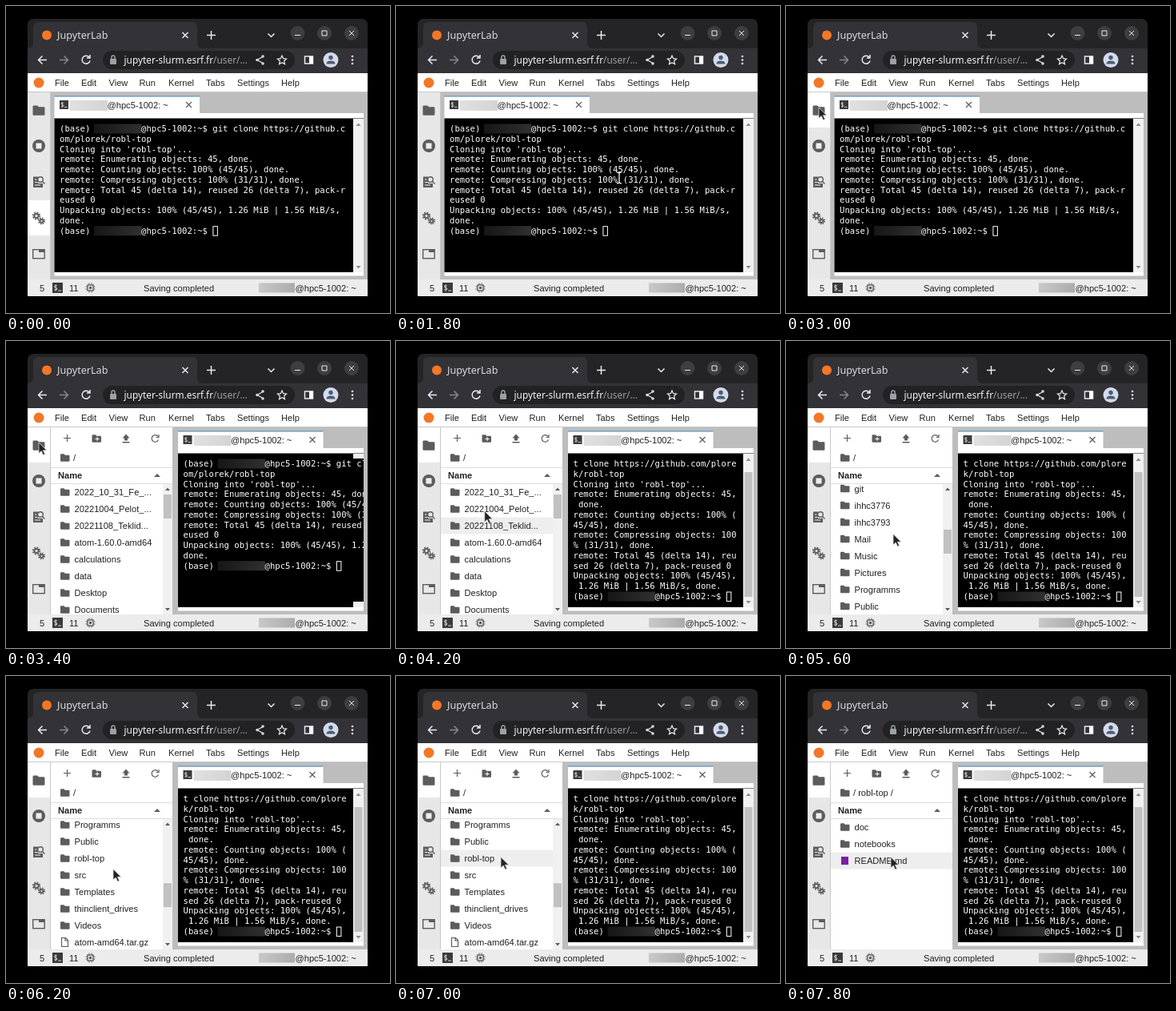
An HTML page for the animation above (8 s loop, 480 px wide and 384 px high).

```html
<!DOCTYPE html>
<html lang="en">
<head>
<meta charset="utf-8">
<title>JupyterLab file browser</title>
<style>
  html, body { margin: 0; width: 100%; height: 100%; overflow: hidden; background: #000; }
  svg { display: block; width: 100vw; height: 100vh; }
  text { font: 11.1px "Liberation Sans", Arial, sans-serif; fill: #212121; white-space: pre; }
  .chrome text { font: 11.85px "Noto Sans", "Open Sans", sans-serif; fill: #f1f3f4; }
  .chrome .title { font-size: 12.6px; fill: #dadce0; }
  .chrome .dim { fill: #9aa0a6; }
  .term text { font: 10.6px "DejaVu Sans Mono", monospace; fill: #fff; }
  .bold { font-weight: bold; }
  .line { fill: none; stroke: #e8eaed; stroke-width: 1.5; }
  .ink { fill: none; stroke: #5c5c5c; stroke-width: 1.4; }
  .icon { fill: #5c5c5c; }
</style>
</head>
<body>
<svg viewBox="0 0 480 384">
  <defs>
    <path id="folder" d="M0 1.3Q0 .3 1 .3h3.4l1.4 1.5h4.7q1 0 1 1v6q0 1-1 1H1q-1 0-1-1z"/>
    <g id="prompt">
      <rect width="11" height="11" fill="#3a3a3a"/>
      <path d="M4.800 3.300q-2.800-.8-2.800.8 0 1 1.500 1.300t1.500 1.400q0 1.600-3 .7M3.500 2v7M6 8.500h3.500" fill="none" stroke="#ddd" stroke-width=".8"/>
    </g>
    <linearGradient id="pale"><stop stop-color="#e0e0e0"/><stop offset="1" stop-color="#d4d4d4"/></linearGradient>
    <linearGradient id="mid"><stop stop-color="#c8c8c8"/><stop offset="1" stop-color="#acacac"/></linearGradient>
    <linearGradient id="dark"><stop stop-color="#161616"/><stop offset="1" stop-color="#303030"/></linearGradient>
    <clipPath id="window"><path d="M27 24q0-8 8-8h409q8 0 8 8v339H27z"/></clipPath>
    <clipPath id="pane"><rect x="55" y="107" width="392" height="235"/></clipPath>
    <clipPath id="listBox"><rect x="55" y="179" width="153" height="163"/></clipPath>
  </defs>

  <g clip-path="url(#window)">
    <g class="chrome">
      <rect x="27" y="16" width="425" height="40" fill="#242426"/>
      <path d="M27 53q7 0 7-7V27q0-7 7-7h191q7 0 7 7v19q0 7 7 7h206v31H27z" fill="#333236"/>
      <circle cx="51" cy="36.500" r="6" fill="#f37726"/>
      <text class="title" x="64" y="41">JupyterLab</text>
      <path class="line" d="M220.500 33l7 7m0-7l-7 7M251 36.500h11m-5.500-5.500v11M327.500 34.500l4 4 4-4"/>
      <g fill="#3e3e40"><circle cx="364.500" cy="34" r="9"/><circle cx="398" cy="34" r="9"/><circle cx="432" cy="34" r="9"/></g>
      <path class="line" style="stroke-width:1" d="M361 36.500h7M395 31h6v6h-6zM429 31l6 6m0-6l-6 6"/>

      <rect x="121" y="56" width="240" height="23" rx="11.500" fill="#222224"/>
      <path class="line" d="M51 67.500H40.500m5-5l-5 5 5 5"/>
      <path class="line" style="stroke:#85878a" d="M67 67.500h10.500m-5-5l5 5-5 5"/>
      <path class="line" d="M104 64a5 5 0 1 0 1 4.500M105 61v4h-4"/>
      <rect x="130" y="66" width="8" height="7" rx="1" fill="#9aa0a6"/>
      <path class="line" style="stroke:#9aa0a6" d="M132 66v-2a2 2 0 0 1 4 0v2"/>
      <text x="147.500" y="72">jupyter-slurm.esrf.fr<tspan class="dim">/user/...</tspan></text>
      <path class="line" style="stroke-width:1.200" d="M321 63.500l-7 4 7 4"/>
      <g fill="#d5d7da"><circle cx="321" cy="63" r="1.800"/><circle cx="314" cy="67.500" r="1.800"/><circle cx="321" cy="72" r="1.800"/></g>
      <path class="line" style="stroke-width:1.200" d="M345 62l1.600 3.700 4 .4-3 2.700.9 4-3.500-2.100-3.500 2.100.9-4-3-2.700 4-.4z"/>
      <rect class="line" x="373.500" y="63" width="10" height="9"/>
      <rect x="379" y="63" width="5" height="9" fill="#fff"/>
      <circle cx="406" cy="67.500" r="9.500" fill="#d3dced"/>
      <circle cx="406" cy="64.500" r="2.700" fill="#4f5b70"/>
      <path d="M400.500 72.500q0-4 5.500-4t5.500 4z" fill="#4f5b70"/>
      <g fill="#e8eaed"><circle cx="433" cy="63" r="1.300"/><circle cx="433" cy="67.500" r="1.300"/><circle cx="433" cy="72" r="1.300"/></g>
    </g>

    <rect x="27" y="84" width="425" height="279" fill="#fff"/>
    <circle cx="41" cy="96" r="6.500" fill="#f37726"/>
    <g id="menu"></g>

    <rect x="27" y="107" width="28" height="235" fill="#e8e7e8"/>
    <rect id="activeCell" x="27" width="28" height="44" fill="#fff"/>
    <g class="icon">
      <use href="#folder" transform="translate(33.500 124) scale(1.300)"/>
      <circle cx="41" cy="175" r="8"/><rect x="37.500" y="171.500" width="7" height="7" fill="#eee"/>
      <path d="M34 213.500h6v13.500h-6zM40 222h6v5h-6z"/>
      <path d="M36 217h2.500m-2.500 3.500h3.500m-3.500 3.500h7" stroke="#eee"/>
    </g>
    <circle class="ink" cx="43" cy="217" r="3.300"/>
    <path class="ink" d="M45.500 219.500l3 3"/>
    <g class="ink" style="stroke-width:1.900">
      <circle cx="38" cy="262.500" r="2.500"/><circle cx="38" cy="262.500" r="4.200" stroke-dasharray="1.800 1.500"/>
      <circle cx="44.500" cy="269" r="2"/><circle cx="44.500" cy="269" r="3.600" stroke-dasharray="1.500 1.330"/>
    </g>
    <rect class="ink" x="33.700" y="304.700" width="14.500" height="11"/>
    <path class="icon" d="M41 304h7v4h-7z"/>

    <rect x="55" y="107" width="397" height="235" fill="#bdbdbd"/>
    <g clip-path="url(#pane)">
      <g id="dock">
        <rect x="60.500" y="113" width="181.500" height="22" fill="#fff"/>
        <rect x="60.500" y="112.500" width="181.500" height="1" fill="#4585bd"/>
        <use href="#prompt" x="67" y="118"/>
        <rect x="80" y="118" width="47" height="13" fill="url(#pale)"/>
        <text x="126.500" y="127.500">@hpc5-1002: ~</text>
        <path class="ink" style="stroke-width:1.200" d="M225 120l7 7m0-7l-7 7"/>
        <rect x="60.500" y="134" width="387" height="203.500" fill="#fff"/>
        <rect x="60.500" y="140.500" width="387" height="192.500" fill="#000"/>
        <g class="term" id="term"></g>
      </g>
      <g id="termBar"></g>
    </g>

    <g id="browser">
      <rect x="55" y="107" width="153" height="235" fill="#fff"/>
      <path class="ink" style="stroke-width:1.200" d="M72 121.500h9m-4.500-4.500v9M190 119.500a4.300 4.300 0 1 0 .5 4M191 117v3.500h-3.500"/>
      <g class="icon">
        <use href="#folder" x="107.500" y="117"/>
        <path d="M150 116.500l4.500 5H152v3h-4v-3h-2.500zM145.500 126h9v1.500h-9z"/>
        <use href="#folder" x="68" y="141"/>
        <path d="M185 170h8l-4-4z"/>
      </g>
      <path d="M114 120v5m-2.500-2.500h5" stroke="#fff"/>
      <text id="crumb" x="84" y="150"></text>
      <path d="M55 158.500h153M55 178.500h153" stroke="#ddd"/>
      <text class="bold" x="65" y="172">Name</text>
      <g clip-path="url(#listBox)">
        <g id="list"></g>
        <g id="listBar">
          <rect x="196" y="179" width="12" height="163" fill="#f1f1f1"/>
          <rect id="thumb" x="197" width="10" height="30" fill="#c1c1c1"/>
          <path class="icon" d="M199 187h6l-3-3.500zM199 334h6l-3 3.500z"/>
        </g>
      </g>
    </g>
    <path d="M55.500 107v235M27 107.500h425" stroke="#c8c8c8"/>

    <rect x="27" y="342" width="425" height="21" fill="#ececec"/>
    <text x="42" y="356.500">5</text>
    <use href="#prompt" transform="translate(58 346) scale(1.180)"/>
    <text x="79" y="356.500">11</text>
    <rect class="ink" x="102" y="349" width="7" height="7"/>
    <rect class="icon" x="104" y="351" width="3" height="3"/>
    <path class="ink" style="stroke-width:1" d="M104 346.500v2m3-2v2m-3 8v2m3-2v2M99.500 351h2m-2 3h2m8-3h2m-2 3h2"/>
    <text x="172" y="356.500">Saving completed</text>
    <rect x="316" y="346.500" width="45" height="12" fill="url(#mid)"/>
    <text x="361.500" y="356.500">@hpc5-1002: ~</text>

    <g id="pointer">
      <path id="arrow" d="M0 0v13.500l3.200-2.900 2.300 5 2.200-1-2.300-4.800h4.400z" fill="#222" stroke="#ddd" stroke-width=".8"/>
      <path id="beam" d="M-3-7q3 0 3 2V5q0 2-3 2M3-7q-3 0-3 2M3 7Q0 7 0 5" fill="none" stroke="#ddd" stroke-width="1.500"/>
    </g>
  </g>
</svg>

<script>
const LOOP = 8000, STEP = 200, ROW = 21, COL = 6.38, LINE = 12.77;
const OPEN = 3400, REFLOW = 3600, ENTER = 7500;
const SHIFT = 154.5;

const el = id => document.getElementById(id);
const show = (id, on) => el(id).setAttribute('display', on ? 'inline' : 'none');
const move = (id, x, y) => el(id).setAttribute('transform', `translate(${x} ${y})`);
const text = (x, y, s) => `<text x="${x}" y="${y}">${s}</text>`;

const menu = { File: 61, Edit: 94, View: 128.5, Run: 166.5, Kernel: 203, Tabs: 250, Settings: 289, Help: 344 };
el('menu').innerHTML = Object.entries(menu).map(([s, x]) => text(x, 100, s)).join('');

const prompt = '(base)          @hpc5-1002:~$ ';
const output = [
  prompt + 'git clone https://github.com/plorek/robl-top',
  "Cloning into 'robl-top'...",
  'remote: Enumerating objects: 45, done.',
  'remote: Counting objects: 100% (45/45), done.',
  'remote: Compressing objects: 100% (31/31), done.',
  'remote: Total 45 (delta 14), reused 26 (delta 7), pack-reused 0',
  'Unpacking objects: 100% (45/45), 1.26 MiB | 1.56 MiB/s, done.',
  prompt
];

const home = ['2022_10_31_Fe_...', '20221004_Pelot_...', '20221108_Teklid...', 'atom-1.60.0-amd64',
  'calculations', 'data', 'Desktop', 'Documents', 'Downloads', 'examples', 'fits', 'git',
  'ihhc3776', 'ihhc3793', 'Mail', 'Music', 'Pictures', 'Programms', 'Public', 'robl-top',
  'src', 'Templates', 'thinclient_drives', 'Videos', 'atom-amd64.tar.gz'];
const project = ['doc', 'notebooks', 'README.md'];

// Each entry: time, then the values reached at that time.
const pointerPath = [[0, 18, 265], [200, 20, 264], [800, 279, 215], [1800, 279, 215],
  [3000, 41, 127], [3600, 41, 127], [4400, 134, 241.5], [6200, 134, 241.5], [6600, 131, 226.5]];
const scrollPath = [[4600, 0], [4800, 25.5], [5600, 235.5], [6200, 360]];

function at(path, t) {
  const i = path.findIndex(p => p[0] > t);
  if (i < 0) return path[path.length - 1].slice(1);
  if (i === 0) return path[0].slice(1);
  const a = path[i - 1], b = path[i], k = (t - a[0]) / (b[0] - a[0]);
  return a.slice(1).map((v, j) => v + (b[j + 1] - v) * k);
}

function drawTerminal(cols) {
  const wrap = new RegExp(`.{1,${cols}}`, 'g');
  const lines = output.flatMap(s => s.match(wrap)).slice(-14);
  const last = lines.length - 1;
  el('term').innerHTML = lines.map((s, i) => {
    const y = 157 + i * LINE;
    const hidden = s.startsWith('(base)')
      ? `<rect x="110" y="${y - 9.5}" width="59.500" height="12" fill="url(#dark)"/>` : '';
    return hidden + text(67, y, s);
  }).join('') + `<rect x="${67.5 + prompt.length * COL}" y="${148 + last * LINE}" width="5.500"
    height="11.500" fill="none" stroke="#fff"/>`;
}

function drawTermBar(mode) {
  const bar = '<rect x="434" y="141" width="13" height="192" fill="#f1f1f1"/>';
  const thumb = '<rect x="435.500" y="164" width="10" height="156" fill="#c1c1c1"/>';
  const arrows = '<path d="M437.500 150h6l-3-3.500zM437.500 325h6l-3 3.500z" fill="#8a8a8a"/>';
  const stubs = '<path d="M434 141h13v6h-13zM434 326h13v7h-13z" fill="#f1f1f1"/>';
  el('termBar').innerHTML = [bar + arrows, stubs, bar + thumb + arrows][mode];
}

function fileIcon(name) {
  if (name.endsWith('.md')) return '<rect x="69" y="-5" width="9" height="10" fill="#7b1fa2"/>';
  if (name.endsWith('.gz')) return '<path class="ink" style="stroke-width:1.200" d="M69.500-5.500h5l3 3v8h-8zM74-5.500v3.500h3.500"/>';
  return '<use class="icon" href="#folder" x="68" y="-5"/>';
}

function drawList(names, hover) {
  el('list').innerHTML = names.map((s, i) =>
    `<g transform="translate(0 ${189 + i * ROW})">` +
    (i === hover ? '<rect x="55" y="-10.500" width="153" height="21" fill="#eee"/>' : '') +
    fileIcon(s) + text(85.5, 4, s) + '</g>').join('');
}

let lastMode, lastList;

function render(time) {
  const t = Math.floor(time % LOOP / STEP) * STEP;
  const open = t >= OPEN, inside = t >= ENTER;
  const mode = t >= REFLOW ? 2 : open ? 1 : 0;
  if (mode !== lastMode) {
    drawTerminal(mode === 2 ? 32 : 56);
    drawTermBar(mode);
    move('dock', open ? SHIFT : 0, 0);
    show('browser', open);
    lastMode = mode;
  }

  const hover = inside ? 2 : t >= 6600 ? 19 : t >= 4200 && t < 5400 ? 2 : -1;
  const key = inside + ':' + hover;
  if (key !== lastList) {
    drawList(inside ? project : home, hover);
    el('crumb').textContent = inside ? '/ robl-top /' : '/';
    show('listBar', !inside);
    lastList = key;
  }
  const [scroll] = at(scrollPath, t);
  move('list', 0, inside ? 0 : -scroll);
  el('thumb').setAttribute('y', 192 + scroll / 5.36);

  show('activeCell', t < 200 || t >= 3000);
  el('activeCell').setAttribute('y', t < 200 ? 243 : 108);

  const [x, y] = at(pointerPath, t);
  const typing = x > (open ? 215 : 61) && x < 434 && y > 141;
  move('pointer', x, y);
  show('pointer', x > 27);
  show('beam', typing);
  show('arrow', !typing);
}

const start = performance.now();
function tick() {
  render(performance.now() - start);
  requestAnimationFrame(tick);
}
tick();
</script>
</body>
</html>
```
